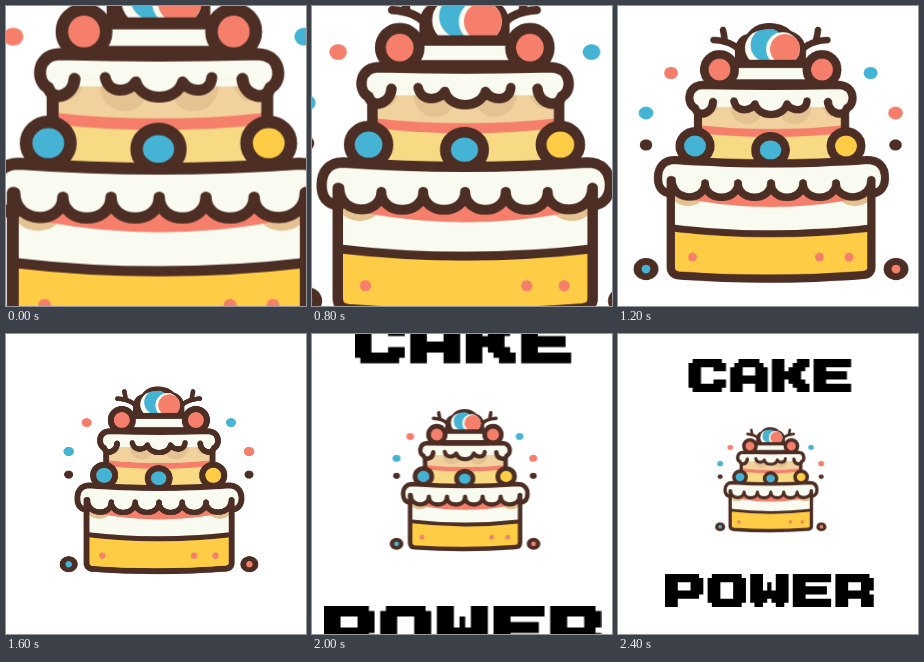
Recreate the animation shown at these times as an HTML page. Size 300 by 300 pixels, loop 2800 ms.

```html
<!DOCTYPE html>
<html lang="en">
<head>
<meta charset="utf-8">
<title>Cake Power</title>
<style>
  html, body { margin: 0; width: 100%; height: 100%; overflow: hidden; background: #fff; }
  svg { display: block; width: 100vw; height: 100vh; }
  .cake, .words { transform-origin: 0 0; animation: shrink 2.8s step-end infinite; }
  .words { animation-name: arrive; }

  .line { fill: none; stroke: #4d2e25; stroke-width: 8.2; stroke-linecap: round; stroke-linejoin: round; }
  .ball { stroke: #4d2e25; stroke-width: 8.6; }
  .dark { fill: #4d2e25; }
  .red { fill: #f67f6c; }
  .blue { fill: #45b4d4; }
  .yellow { fill: #fecd45; }
  .pale { fill: #f8da85; }
  .cream { fill: #f9fbf0; }
  .tan { fill: #f1d29f; }
  .shade { fill: #e5c291; }

  /* The cake drops back in hard steps */
  @keyframes shrink {
    0%        { transform: matrix(1.46, 0, 0, 1.46, -70.2, -67.2); }
    28.57143% { transform: matrix(1.27, 0, 0, 1.27, -41.2, -39.1); }
    42.85714% { transform: none; }
    57.14286% { transform: matrix(.723, 0, 0, .723, 42.4, 40.1); }
    71.42857% { transform: matrix(.548, 0, 0, .548, 69.2, 65.7); }
    85.71429%, 100% { transform: matrix(.405, 0, 0, .405, 90.8, 86.3); }
  }
  @keyframes arrive {
    0%        { visibility: hidden; }
    71.42857% { visibility: visible; transform: matrix(1.33, 0, 0, 1.33, -51, -47.7); }
    85.71429%, 100% { visibility: visible; transform: none; }
  }
</style>
</head>
<body>
<svg viewBox="0 0 300 300">
  <defs>
    <path id="C" d="M1 0H8V1H9V3H6V2H3V6H6V5H9V7H8V8H1V7H0V1H1Z"/>
    <path id="A" d="M2 0H7V1H8V2H9V8H6V6H3V8H0V2H1V1H2ZM3 2V4H6V2Z"/>
    <path id="K" d="M0 0H3V3H4V2H5V1H6V0H9V2H8V3H7V5H8V6H9V8H6V7H5V6H4V5H3V8H0Z"/>
    <path id="E" d="M0 0H9V2H3V3H8V5H3V6H9V8H0Z"/>
    <path id="P" d="M0 0H8V1H9V5H8V6H3V8H0ZM3 2V4H6V2Z"/>
    <path id="O" d="M1 0H8V1H9V7H8V8H1V7H0V1H1ZM3 2V6H6V2Z"/>
    <path id="W" d="M0 0H3V4H4V2H5V4H6V0H9V7H8V8H6V7H5V6H4V7H3V8H1V7H0Z"/>
    <path id="R" d="M0 0H8V1H9V4H8V5H9V8H6V6H3V8H0ZM3 2V4H6V2Z"/>
    <path id="antler" d="M122 45Q114 35 95.5 34M107 35L105 24"/>
    <path id="base" d="M52.7 174V261Q52.7 268.5 61 269.5Q153 276 245 269Q253.4 268.5 253.4 261V174"/>
    <path id="wave" d="M116 95C118 106 132 106 137 98C141 112 165 112 169 98C174 106 188 106 189 95"/>
    <path id="icing" d="M95 96C94 108 80 112 77 102C69 99 68 80 84 79Q153 81 221 79C238 80 237 99 229 102C226 112 211 108 210 96"/>
    <path id="rim" d="M54 188C43 187 40 180 40 172C40 160 47 154 57 154Q153 161 249 154C260 154 267 160 267 172C267 180 263 187 253 188"/>
    <path id="drips" d="M54 174C54 196 87 196 87 177C87 196 120 196 120 177C120 196 153 196 153 177C153 196 185 196 185 177C185 196 218 196 218 177C218 196 253 196 253 174"/>
    <clipPath id="inBase"><use href="#base"/></clipPath>
    <clipPath id="inGlobe"><ellipse cx="152.5" cy="43" rx="30" ry="20"/></clipPath>
  </defs>

  <g class="cake">
    <!-- confetti -->
    <ellipse class="red" cx="53" cy="67" rx="7" ry="6.2"/>
    <ellipse class="blue" cx="252.5" cy="67" rx="7" ry="6.2"/>
    <ellipse class="blue" cx="28" cy="107" rx="7.3" ry="6.4"/>
    <ellipse class="red" cx="277.5" cy="107" rx="7.3" ry="6.4"/>
    <ellipse class="dark" cx="28" cy="139" rx="6.3" ry="5.6"/>
    <ellipse class="dark" cx="277.5" cy="139" rx="6.3" ry="5.6"/>
    <ellipse class="dark" cx="28" cy="263" rx="12.5" ry="11"/>
    <ellipse class="dark" cx="278" cy="263" rx="12.5" ry="11"/>
    <circle class="blue" cx="28" cy="263" r="4.4"/>
    <circle class="red" cx="278" cy="263" r="4.4"/>

    <!-- topper -->
    <g class="line" style="stroke-width:6.5">
      <use href="#antler"/>
      <use href="#antler" transform="translate(305) scale(-1 1)"/>
    </g>
    <path class="dark" d="M117 58V44Q118 31 129 28Q137 17 151 17Q165 17 173 25Q187 30 188 44V58Z"/>
    <g clip-path="url(#inGlobe)">
      <circle class="cream" cx="145" cy="42" r="18"/>
      <circle class="blue" cx="149.5" cy="39" r="17"/>
      <circle class="cream" cx="165" cy="43" r="17"/>
      <circle class="red" cx="167" cy="43" r="15"/>
    </g>
    <rect class="line" x="112" y="58" width="81" height="19.5" style="fill:#f9fbf0"/>

    <!-- upper tier -->
    <path class="tan" d="M80 92H227V156H80Z"/>
    <path class="shade" d="M84 104Q92 118 101 100ZM112 100C114 122 138 122 143 110H163C168 122 192 122 194 100ZM203 100Q213 120 224 104Z"/>
    <path class="pale" d="M80 126Q153 134 227 126V158H80Z"/>
    <path class="red" d="M80 119Q153 127 227 119V127Q153 135 80 127Z"/>
    <path class="line" d="M80 98V154M227 98V154"/>
    <path class="cream" d="M95 96H210V101H95Z"/>
    <use class="cream" href="#icing"/>
    <use class="cream" href="#wave"/>
    <use class="line" href="#icing"/>
    <use class="line" href="#wave" style="stroke-width:7.5"/>
    <circle class="ball red" cx="101.5" cy="63.5" r="15.2"/>
    <circle class="ball red" cx="204" cy="63.5" r="15.2"/>

    <!-- berries -->
    <ellipse class="ball blue" cx="77" cy="140" rx="15.2" ry="14.6"/>
    <ellipse class="ball yellow" cx="228" cy="140" rx="15.2" ry="14.6"/>
    <ellipse class="ball blue" cx="152.5" cy="144" rx="15" ry="13.8"/>

    <!-- lower tier -->
    <g clip-path="url(#inBase)">
      <rect class="cream" x="50" y="170" width="207" height="110"/>
      <ellipse class="shade" cx="70" cy="190" rx="15" ry="10"/>
      <ellipse class="shade" cx="237" cy="190" rx="15" ry="10"/>
      <path class="red" d="M76 180H231V194Q153 208 76 194Z"/>
      <path class="yellow" d="M50 221.5Q153 234 257 221.5V280H50Z"/>
      <path class="line" style="stroke-width:7" d="M50 221.5Q153 234 257 221.5"/>
    </g>
    <circle class="red" cx="74.5" cy="251" r="4.4"/>
    <circle class="red" cx="201.5" cy="251" r="4.4"/>
    <circle class="red" cx="231" cy="251" r="4.4"/>
    <use class="cream" href="#rim"/>
    <use class="cream" href="#drips"/>
    <use class="line" href="#base"/>
    <use class="line" href="#rim"/>
    <use class="line" href="#drips" style="stroke-width:7.8"/>
  </g>

  <!-- block lettering, nine by eight cells per letter -->
  <g class="words" role="img" aria-label="CAKE POWER">
    <g transform="translate(70.5 25) scale(4.17 4.12)">
      <use href="#C"/><use href="#A" x="10"/><use href="#K" x="20"/><use href="#E" x="30"/>
    </g>
    <g transform="translate(47 240) scale(4.26 4.12)">
      <use href="#P"/><use href="#O" x="10"/><use href="#W" x="20"/><use href="#E" x="30"/><use href="#R" x="40"/>
    </g>
  </g>
</svg>
</body>
</html>
```
